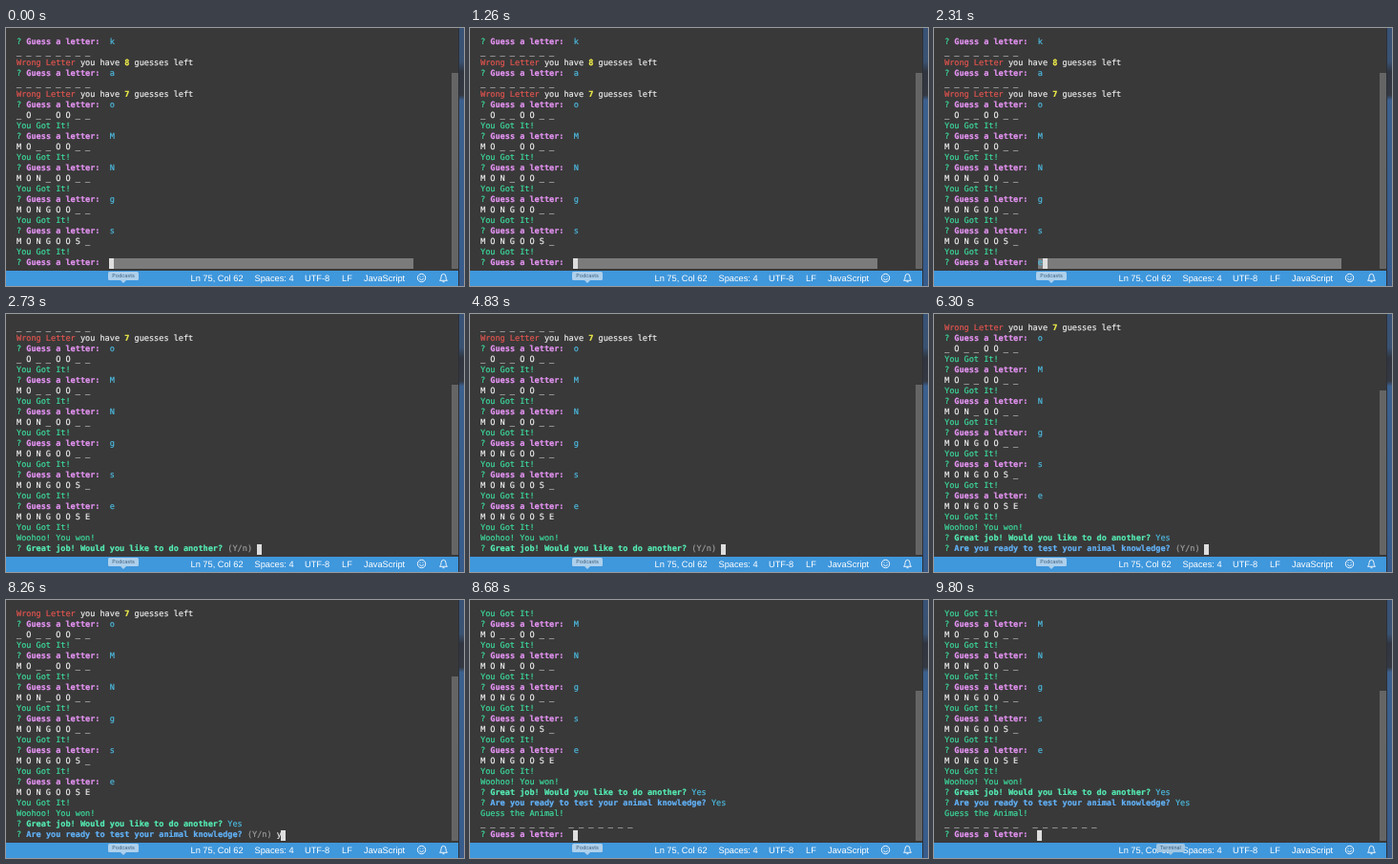
Animation, 480 px wide and 270 px high, one loop 9.87 s. Source, as an HTML page:

```html
<!DOCTYPE html>
<html lang="en">
<head>
<meta charset="utf-8">
<title>Guess a letter</title>
<style>
  html, body { margin: 0; width: 100%; height: 100%; overflow: hidden; background: #393939; }
  #stage { position: relative; width: 480px; height: 270px; overflow: hidden; background: #393939; }
  #stage * { box-sizing: border-box; }
  #stage [class] { animation-duration: 9870ms; animation-timing-function: step-end; animation-iteration-count: infinite; }

  /* terminal */
  .term { position: absolute; left: 11px; top: 10px; width: 450px; height: 242px; overflow: hidden;
    font: 8.55px/11px "DejaVu Sans Mono", monospace; color: #ececec; white-space: pre;
    text-rendering: geometricPrecision; -webkit-text-stroke: .2px; }
  .log { position: absolute; left: 0; top: 0; z-index: 1; animation-name: scroll; }
  .log div { height: 11px; }
  .green { color: #3cdb9d; }
  .ask { color: #e493f2; font-weight: bold; }
  .cyan { color: #4cbbe0; }
  .red { color: #e2544f; }
  .num { color: #f3f04a; font-weight: bold; }
  .job { color: #55ecb4; font-weight: bold; }
  .ready { color: #62b2f8; font-weight: bold; }
  .slot { position: relative; }
  .slot span { position: absolute; left: 0; top: 0; line-height: 11px; }
  .hint { color: #9c9c9c; }
  .typed { color: #ececec; }
  .slot .typed { left: 6ch; }
  .e { animation-name: e; }
  .hint1 { animation-name: hint1; }
  .y1 { animation-name: y1; }
  .yes1 { animation-name: yes1; }
  .hint2 { animation-name: hint2; }
  .y2 { animation-name: y2; }
  .yes2 { animation-name: yes2; }
  .field { position: absolute; left: 98px; top: 231px; width: 318px; height: 11px; background: #7b7b7b; animation-name: field; }
  .cursor { position: absolute; left: 19ch; top: 231px; width: 5px; height: 11px; margin-left: -.4px; background: #dedede; animation-name: cursor; }
  .thumb { position: absolute; left: 467px; top: 47px; width: 7px; bottom: 18px; background: #656565; animation-name: thumb; }

  /* surroundings */
  .desk { position: absolute; left: 474px; top: 0; width: 6px; height: 270px; border-left: 1px solid #2b3038;
    background: linear-gradient(#385276, #3a5272 13%, #30353f 17%, #343841 26%, #3c608e 28%, #375b8b); }
  .bar { position: absolute; left: 0; top: 254px; width: 474px; height: 16px; background: #3f97dc; color: #fff;
    font: 9.25px/17px "Liberation Sans", Arial, sans-serif; text-rendering: geometricPrecision; white-space: pre; }
  .bar span { position: absolute; top: 0; }
  .bar svg { position: absolute; left: 429px; top: 1px; fill: none; stroke: #fff; stroke-width: .9; }
  .tip { position: absolute; top: 255px; height: 9px; border-radius: 1.5px; background: #add0ec; color: #3c5a78;
    font: 5.4px/9.5px "Inter", Arial, sans-serif; text-align: center; }
  .tip::after { content: ""; position: absolute; left: 50%; top: 100%; margin-left: -3px;
    border: 3px solid transparent; border-top-color: inherit; border-bottom: 0; }
  .pod { left: 107px; width: 32px; border-color: #add0ec; animation-name: pod; }
  .trm { left: 233px; width: 30px; background: #a0c6e3; border-color: #a0c6e3; animation-name: trm; }

  /* e typed 21.986, sent 26.95; first y 59.574, sent 63.121; second y 81.56, sent 85.106 */
  @keyframes scroll {
    0% { transform: none; }
    26.95% { transform: translateY(-44px); }
    63.121% { transform: translateY(-55px); }
    85.106%, 100% { transform: translateY(-88px); }
  }
  @keyframes thumb {
    0% { top: 47px; }
    26.95% { top: 74px; }
    63.121% { top: 80px; }
    85.106%, 100% { top: 95px; }
  }
  @keyframes cursor {
    0% { left: 19ch; }
    21.986% { left: 20ch; }
    26.95% { left: 49ch; }
    59.574% { left: 50ch; }
    63.121% { left: 53ch; }
    81.56% { left: 54ch; }
    85.106%, 100% { left: 19ch; }
  }
  @keyframes field { 0% { opacity: 1; } 26.95%, 100% { opacity: 0; } }
  @keyframes e { 0% { opacity: 0; } 21.986%, 100% { opacity: 1; } }
  @keyframes hint1 { 0% { opacity: 1; } 63.121%, 100% { opacity: 0; } }
  @keyframes y1 { 0% { opacity: 0; } 59.574% { opacity: 1; } 63.121%, 100% { opacity: 0; } }
  @keyframes yes1 { 0% { opacity: 0; } 63.121%, 100% { opacity: 1; } }
  @keyframes hint2 { 0% { opacity: 1; } 85.106%, 100% { opacity: 0; } }
  @keyframes y2 { 0% { opacity: 0; } 81.56% { opacity: 1; } 85.106%, 100% { opacity: 0; } }
  @keyframes yes2 { 0% { opacity: 0; } 85.106%, 100% { opacity: 1; } }
  @keyframes pod { 0% { opacity: 1; } 95.745%, 100% { opacity: 0; } }
  @keyframes trm { 0% { opacity: 0; } 95.745%, 100% { opacity: 1; } }
</style>
</head>
<body>
<div id="stage">
  <div class="thumb"></div>
  <div class="term">
    <div class="field"></div>
    <div class="cursor"></div>
    <div class="log" id="log"></div>
  </div>
  <div class="bar">
    <span style="left:193.5px">Ln 75, Col 62</span>
    <span style="left:260.5px">Spaces: 4</span>
    <span style="left:313px">UTF-8</span>
    <span style="left:352px">LF</span>
    <span style="left:375px">JavaScript</span>
    <svg width="40" height="13" viewBox="0 0 40 13">
      <circle cx="6.5" cy="6.5" r="4.2"/>
      <path d="M4.3 7.4Q6.5 10 8.7 7.4M5 4.7v1M8 4.7v1"/>
      <path d="M25.6 9.3Q27 8 27 5.6Q27 2.4 29.5 2.4T32 5.6Q32 8 33.4 9.3ZM28.5 10.7h2"/>
    </svg>
  </div>
  <div class="desk"></div>
  <div class="tip pod">Podcasts</div>
  <div class="tip trm">Terminal</div>
</div>
<script>
  const tint = (name, text) => `<span class="${name}">${text}</span>`;
  const spaced = word => [...word].join(' ');
  const mark = tint('green', '?') + ' ';
  const guess = (letter, extra = '') => mark + tint('ask', 'Guess a letter:') + '  ' + tint('cyan ' + extra, letter);
  const wrong = left => tint('red', 'Wrong Letter') + ' you have ' + tint('num', left) + ' guesses left';
  const gotIt = tint('green', 'You Got It!');
  const miss = (letter, left) => [guess(letter), spaced('________'), wrong(left)];
  const hit = (letter, word, extra) => [guess(letter, extra), spaced(word), gotIt];
  const confirm = (name, text, n) => mark + tint(name, text) + ' ' + tint('slot',
    tint('hint hint' + n, '(Y/n)') + tint('typed y' + n, 'y') + tint('cyan yes' + n, 'Yes'));

  const lines = [
    ...miss('k', 8),
    ...miss('a', 7),
    ...hit('o', '_O__OO__'),
    ...hit('M', 'MO__OO__'),
    ...hit('N', 'MON_OO__'),
    ...hit('g', 'MONGOO__'),
    ...hit('s', 'MONGOOS_'),
    ...hit('e', 'MONGOOSE', 'e'),
    tint('green', 'Woohoo! You won!'),
    confirm('job', 'Great job! Would you like to do another?', 1),
    confirm('ready', 'Are you ready to test your animal knowledge?', 2),
    tint('green', 'Guess the Animal!'),
    spaced('________ _______'),
    guess('')
  ];
  document.getElementById('log').innerHTML = lines.map(line => `<div>${line}</div>`).join('');
</script>
</body>
</html>
```
